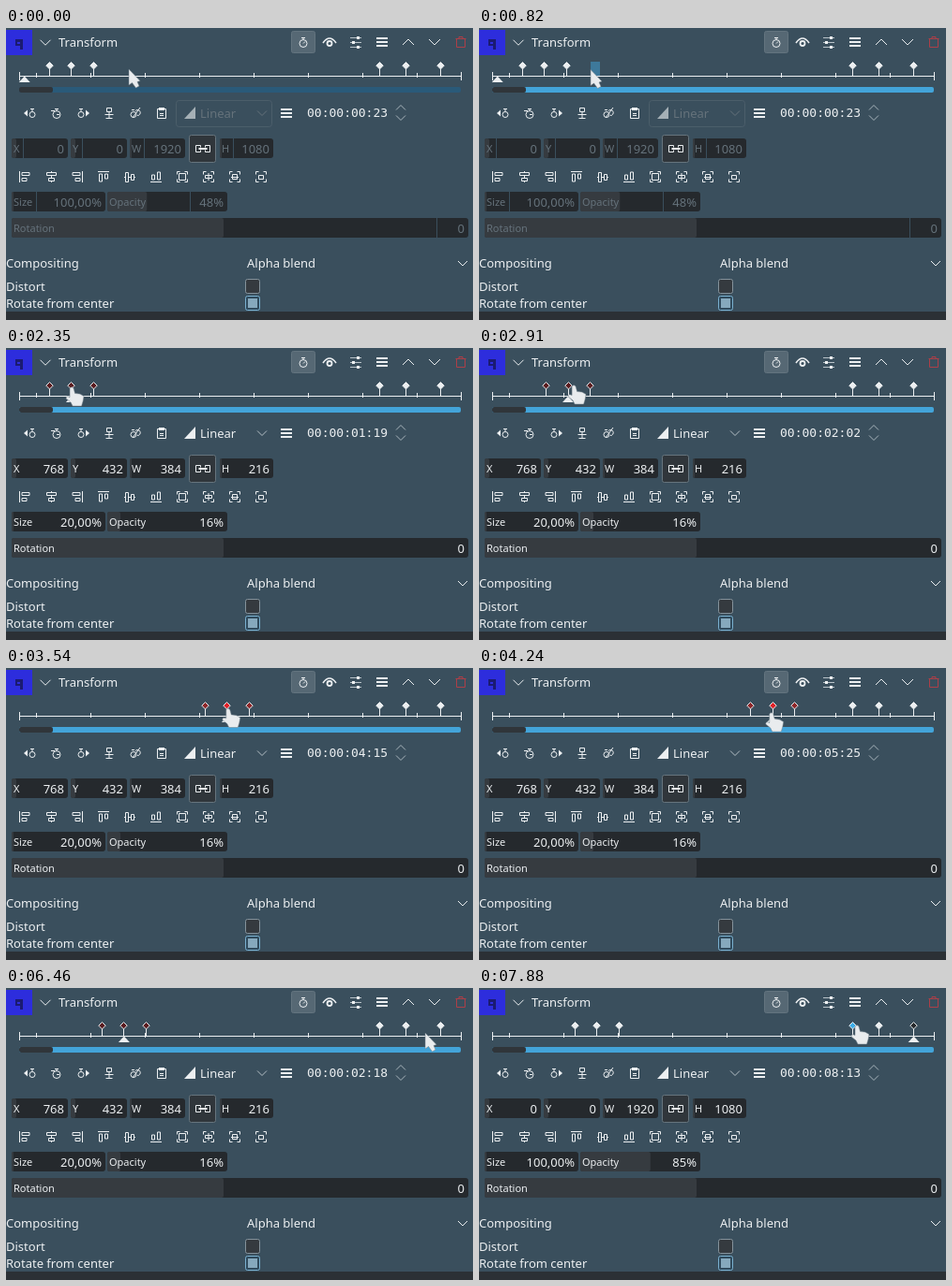
Recreate the animation shown at these times as an HTML page. Size 498x312 px, loop 8000 ms.

```html
<!DOCTYPE html>
<html lang="en">
<head>
<meta charset="utf-8">
<title>Transform keyframes</title>
<style>
  html, body { margin: 0; width: 100%; height: 100%; overflow: hidden; background: #3a4f5d; }
  svg { display: block; width: 498px; height: 312px; font-family: "Noto Sans", sans-serif; }
  .mono { font-family: "DejaVu Sans Mono", monospace; }
</style>
</head>
<body>
<svg viewBox="0 0 498 312"><g id="panel"></g><g id="live"></g></svg>
<script>
const LOOP = 8000;
const INK = '#eceff1', DIM = '#65727b', BG = '#3a4f5d';
const FIELD = '#25292d', FILL = '#363b40', BLUE = '#43a4d9';

const rect = (x, y, w, h, fill, extra = '') =>
  `<rect x="${x}" y="${y}" width="${w}" height="${h}" fill="${fill}" ${extra}/>`;
const line = (d, color = INK, extra = '') =>
  `<path d="${d}" fill="none" stroke="${color}" ${extra}/>`;
const shape = (d, fill = INK, extra = '') => `<path d="${d}" fill="${fill}" ${extra}/>`;
const label = (x, y, s, fill = INK, size = 13, extra = '') =>
  `<text x="${x}" y="${y}" fill="${fill}" font-size="${size}" ${extra}>${s}</text>`;
const at = (x, y, content, more = '') => `<g transform="translate(${x} ${y}) ${more}">${content}</g>`;
const chevron = (x, y, half, dir, color) =>
  line(`M${x - half} ${y - dir * half / 2}l${half} ${dir * half} ${half} ${-dir * half}`, color);
const menu = (x, y) => rect(x - 6, y - 5, 12, 2, INK) + rect(x - 6, y - 1, 12, 2, INK) + rect(x - 6, y + 3, 12, 2, INK);

const STOPWATCH = 'M-4 1.5a4 4 0 1 0 8 0a4 4 0 1 0-8 0M-2-4.5h4M0-4v2';

function headerRow() {
  return rect(0, 2, 28, 27, '#2d2ddd')
    + shape('M10 12h8v11h-3v-4h-5z', '#1b1b72') + rect(12, 15, 3, 2, '#2d2ddd')
    + chevron(42, 15.5, 5.5, 1) + label(56, 20, 'Transform')
    + rect(304.5, 3.5, 25, 23, '#566874', 'rx="2" stroke="#63747f"')
    + at(317, 15, line(STOPWATCH + 'M0 1.5l2-2'))
    + at(345, 15, line('M-7 1Q0-9 7 1', INK, 'stroke-width="1.6"')
      + line('M-2.5 1.5a2.5 2.5 0 1 0 5 0a2.5 2.5 0 1 0-5 0', INK, 'stroke-width="1.8"'))
    + at(373, 15, line('M-6-4.5H6M-6 .5H6M-6 5.5H6', '#b9c3c9')
      + rect(1, -6, 3, 3, INK) + rect(-4, -1, 3, 3, INK) + rect(1, 4, 3, 3, INK))
    + menu(401, 15) + chevron(429, 15, 6, -1) + chevron(457, 15, 6, 1)
    + at(485, 15, line('M-5.5-3.5h11M-2-4v-1.5h4V-4M-4.5-3V5.5h9V-3', '#ad3f48'));
}

function keyframeTools() {
  const step = line('M-1 1.5a3 3 0 1 0 6 0a3 3 0 1 0-6 0M0-4.5h4M2-4v2') + shape('M-7 0l4-3.5v7z');
  return at(26, 91, step) + at(82, 91, step, 'scale(-1 1)')
    + at(54, 91, line(STOPWATCH + 'M-6-2.5h4M0 1.5h3'))
    + at(110, 91, line('M-2.5-5.5h5v4h-5zM0-1v6M-4.5 1.5h9M-3.5 5.5h7'))
    + at(138, 91, line('M-5 1.5a3 3 0 1 0 6 0a3 3 0 1 0-6 0M0-2.5a3 3 0 1 1 2 5M-3 5L5-6M-4-3.5h3'))
    + at(166, 91, line('M-4.5-4.5h9v10h-9zM-2 .5h4M-2 2.5h4') + rect(-3, -6, 6, 3, INK))
    + menu(299, 91) + chevron(421, 85, 5, -1, '#a9b5bc') + chevron(421, 96, 5, 1, '#a9b5bc');
}

function alignTools() {
  const edge = line('M-5.5-6V6M-3-4.5h8v3h-8zM-3 1.5h5v3h-5z');
  const middle = line('M.5-6V-4.5M.5-1.5v3M.5 4.5V6M-4.5-4.5h10v3h-10zM-2.5 1.5h6v3h-6z');
  const corners = line('M-5.5-2.5v-3h3M2.5-5.5h3v3M5.5 2.5v3h-3M-2.5 5.5h-3v-3');
  const fits = ['M-3.5-3.5h7v7h-7z', 'M-3.5-1.5h7v3h-7zM0-4v8', 'M-2.5-2.5h5v5h-5zM-4 .5h8', 'M-2.5-1.5h5v4h-5z'];
  const transpose = 'matrix(0 1 1 0 0 0)';
  return [[edge, ''], [middle, ''], [edge, 'scale(-1 1)'],
    [edge, transpose], [middle, transpose], [edge, 'rotate(-90) scale(1 -1)']]
    .map(([icon, turn], i) => at(20 + 28 * i, 159, icon, turn)).join('')
    + fits.map((d, i) => at(188 + 28 * i, 159, corners + line(d))).join('');
}

function options() {
  return label(0, 256, 'Compositing') + label(257, 256, 'Alpha blend') + chevron(487, 251.5, 5, 1)
    + label(0, 281, 'Distort') + rect(255.5, 268.5, 15, 15, '#353a3f', 'rx="2" stroke="#84929b"')
    + label(0, 299, 'Rotate from center') + rect(255.5, 286.5, 15, 15, '#304b5d', 'rx="2" stroke="#79b0cf"')
    + rect(258, 289, 10, 10, '#86a9bd')
    + rect(0, 303, 498, 9, '#2b3035');
}

function ruler() {
  let d = 'M14 51.5H486M14.5 47V56M485.5 47V56';
  for (let x = 32; x < 485; x += 58) d += `M${x + .5} 48v5`;
  return line(d);
}

document.getElementById('panel').innerHTML =
  headerRow() + keyframeTools() + alignTools() + options() + ruler();

// Motion: [time, ...values], linear in between.
const POINTER = [[0, 131, 44], [550, 131, 44], [750, 129, 45], [1370, 42, 41], [1510, 33, 43], [1650, 33, 43],
  [2210, 70, 42], [2350, 70, 42], [2910, 101, 40], [3120, 120, 41], [3960, 353, 46], [4030, 350, 47],
  [4240, 312, 48], [4660, 201, 47], [4800, 194, 46], [5350, 168, 46], [5550, 136, 46], [5690, 128, 46],
  [5830, 126, 46], [6000, 126, 46], [6460, 447, 48], [6590, 452, 47], [6750, 464, 42], [7060, 464, 42],
  [7410, 436, 44], [7540, 434, 44], [7880, 403, 40]];
const GROUP = [[2350, 69.5], [2910, 95], [3120, 118], [3960, 355], [4030, 352], [4240, 313.5], [4660, 205],
  [4800, 199], [5350, 178], [5550, 140], [5690, 129], [5830, 126]];
const GRAB = 2350, PICK = 6950;

function sample(track, t) {
  const i = track.findIndex(p => p[0] > t);
  if (i < 0) return track.at(-1).slice(1);
  if (i === 0) return track[0].slice(1);
  const a = track[i - 1], b = track[i], k = (t - a[0]) / (b[0] - a[0]);
  return a.slice(1).map((v, j) => v + (b[j + 1] - v) * k);
}

const frameToX = f => 95 + (f - 62) * 1.93;
const xToFrame = x => Math.round(62 + (x - 95) / 1.93);
const pad = n => String(n).padStart(2, '0');
const timecode = f => `00:00:${pad(Math.floor(f / 30))}:${pad(f % 30)}`;

function field(x, y, w, name, value, on, split, fill) {
  const ink = on ? INK : DIM;
  return rect(x, y, w, 21, FIELD, 'rx="3"')
    + rect(x, y, fill, 21, FILL, 'rx="2"')
    + (on ? '' : rect(split, y, 1, 21, BG))
    + label(x + 2, y + 15, name, ink, 11)
    + label(x + w - 4, y + 16, value, ink, 13, 'text-anchor="end"');
}

function fields(t) {
  const on = t >= GRAB, small = on && t < PICK;
  const [x, y, w, h, size] = small ? [768, 432, 384, 216, '20,00%'] : [0, 0, 1920, 1080, '100,00%'];
  const opacity = !on ? 48 : small ? 16 : 85;
  const ink = on ? INK : DIM;
  return (on ? '' : rect(181.5, 77.5, 102, 28, 'none', 'rx="3" stroke="#4b5e6a"'))
    + shape('M190 97L202 84V97z', on ? INK : '#a5b0b6')
    + label(207, 96, 'Linear', ink) + chevron(273, 91, 5, 1, on ? '#b4bfc5' : DIM)
    + field(6, 118, 60, 'X', x, on, 18, 5) + field(69, 118, 60, 'Y', y, on, 81, 5)
    + field(132, 118, 59, 'W', w, on, 147, 2) + field(228, 118, 57, 'H', h, on, 242, 2)
    + rect(195.5, 114.5, 28, 29, '#30363b', 'rx="2" stroke="#66747d"')
    + at(210, 129, line('M-2.5-1.5v-2h-5v7h5v-2M2.5-1.5v-2h5v7h-5v-2M-4.5-.5h9M-4.5 .5h9'))
    + field(6, 175, 100, 'Size', size, on, 32, 2)
    + field(108, 175, 128, 'Opacity', opacity + '%', on, 196, opacity * .88)
    + field(6, 203, 487, 'Rotation', 0, on, 459, 226);
}

const key = (frame, fill, stroke = INK) => {
  const x = Math.floor(frameToX(frame)) + .5;
  return line(`M${x} 44V51`) + shape(`M${x} 36.5l3.7 3.7-3.7 3.7-3.7-3.7z`, fill, `stroke="${stroke}"`);
};

function groupFill(t, i, band, pointerX) {
  if (t >= PICK) return INK;
  if (t < 1650) return band && pointerX < frameToX(37 + 12 * i) ? '#596a75' : INK;
  if (t > 3190 && t < 4660) return i === 1 ? '#df2028' : '#8d2629';
  return '#5a1b1f';
}

function timeline(t, [px]) {
  const middle = xToFrame(sample(GROUP, t)[0]);
  const head = t < GRAB ? 23 : t < PICK ? middle : 253;
  const band = t >= 750 && t < 1650;
  let out = band ? rect(px, 36, Math.max(0, 129 - px), 16, BLUE, 'opacity=".5"') + line(`M${px} 51.5H129`) : '';
  for (let i = 0; i < 3; i++) out += key(middle + 12 * (i - 1), groupFill(t, i, band, px));
  out += key(219, t > 7750 ? '#3daee9' : INK) + key(234, INK) + key(253, t >= PICK ? '#272a2d' : INK);
  const x = frameToX(head);
  return out + shape(`M${x} 51.5l6 6.5h-12z`)
    + rect(14, 63, 471, 6, t < 130 ? '#2a5a79' : BLUE, 'rx="2"') + rect(14, 63, 36, 6, '#30353a', 'rx="2"')
    + label(321, 95, timecode(head), INK, 13, 'class="mono"');
}

function pointer(t, [x, y]) {
  const hand = (t > 2150 && t < 6050) || (t > 6700 && t < 7150) || t > 7700;
  const d = hand
    ? 'M-2 1Q0-1.5 2 1L3.5 6.5Q9 6 13 9.5L12 15 10.5 20H1L-1 16-6 12Q-6 8.5-2 10.5Z'
    : 'M0 0V17L3.5 14.5 7.5 20 11 18 9 13.5 12 12.5Z';
  return at(x, y, shape(d, '#e9ecee', 'stroke="#6f7e88" stroke-width=".5"'));
}

const live = document.getElementById('live');
const start = performance.now();
function draw() {
  const t = (performance.now() - start) % LOOP;
  const p = sample(POINTER, t);
  live.innerHTML = fields(t) + timeline(t, p) + pointer(t, p);
  requestAnimationFrame(draw);
}
draw();
</script>
</body>
</html>
```
